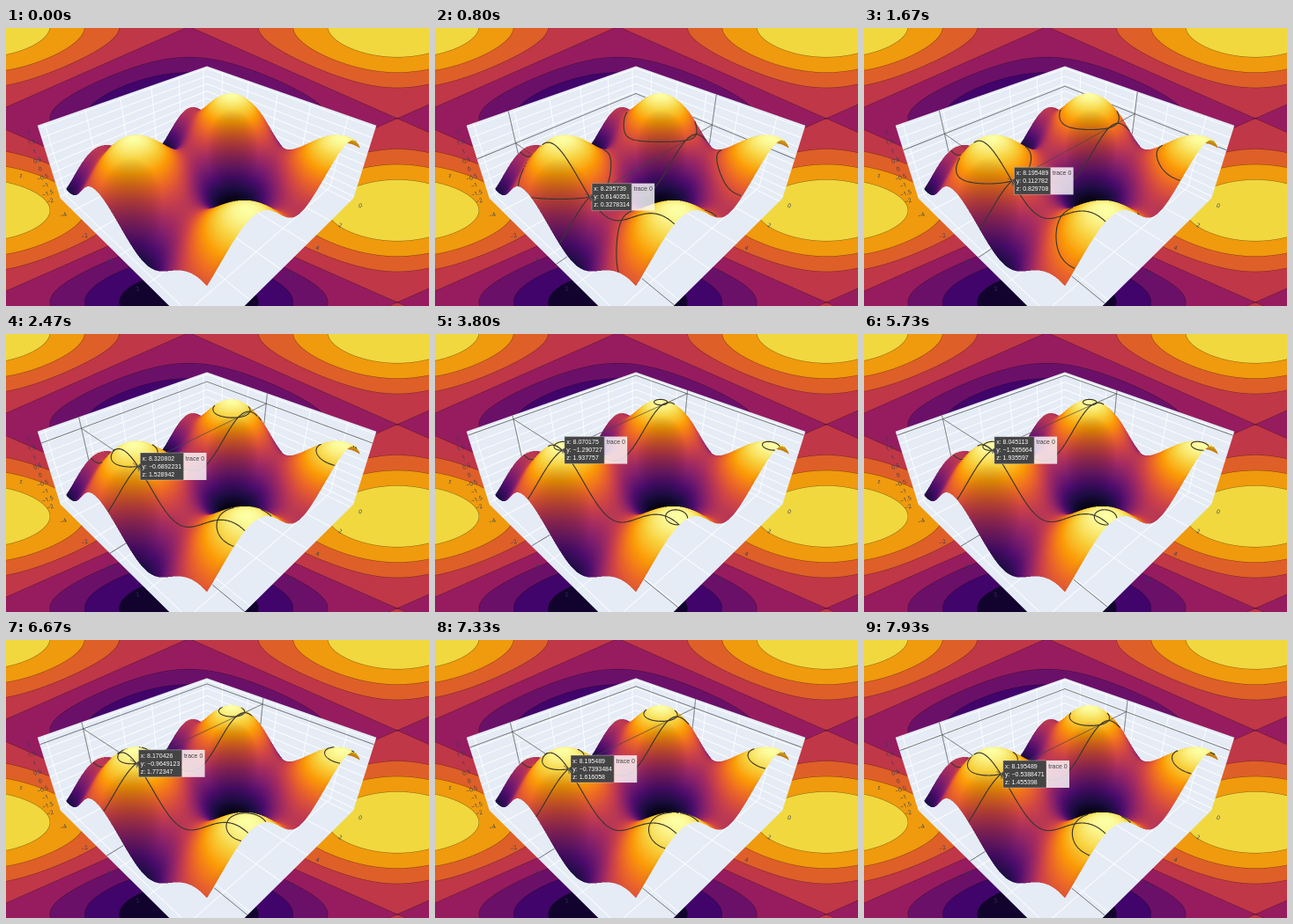
An HTML page with a canvas that plays this animation: 480 by 316 pixels, repeating every 8000 ms.

```html
<!DOCTYPE html>
<html lang="en">
<head>
<meta charset="utf-8">
<title>Surface hover</title>
<style>
html, body { margin: 0; width: 100%; height: 100%; overflow: hidden; }
canvas { display: block; width: 480px; height: 316px; }
</style>
</head>
<body>
<canvas id="stage" width="480" height="316"></canvas>
<script>
const W = 480, H = 316, SS = 2, BW = W * SS, BH = H * SS;
const LOOP = 8000, STEP = 1000 / 15, CELL = 10 / 399;
const { sin, cos, abs, min, max, hypot, floor, sqrt, PI } = Math;
const height = (x, y) => sin(x) - sin(y);
const rgb = hex => [1, 3, 5].map(i => parseInt(hex.slice(i, i + 2), 16));

// Axis box, padded by 1/32 of the data range on every side.
const X0 = -0.3125, X1 = 10.3125, Y0 = -5.3125, Y1 = 5.3125, Z0 = -2.125, Z1 = 2.125;

// Perspective camera on the (1,1,1) diagonal.
const UNIT = 0.12772, DIST = 2.165, FOCAL = 401.8, CX = 228, CY = 155.3;
const ELEV_SIN = sqrt(1 / 3), ELEV_COS = sqrt(2 / 3);
function project(x, y, z) {
  const side = (y - x + 5) * UNIT / Math.SQRT2;
  const near = (x - 5 + y) * UNIT / Math.SQRT2;
  const up = z * UNIT;
  const w = DIST - near * ELEV_COS - up * ELEV_SIN;
  const k = FOCAL / w;
  return [CX + side * k, CY - (up * ELEV_COS - near * ELEV_SIN) * k, w];
}

const INFERNO = ['#000004', '#1b0c41', '#4a0c6b', '#781c6d', '#a52c60',
  '#cf4446', '#ed6925', '#fb9b06', '#f7d13d', '#fcffa4'].map(rgb);
function inferno(t) {
  const p = min(max(t, 0), 1) * 9, i = min(floor(p), 8), f = p - i;
  return INFERNO[i].map((c, n) => c + (INFERNO[i + 1][n] - c) * f);
}
const RAMP = Array.from({ length: 512 }, (_, i) => inferno(i / 511));

function layer() {
  const canvas = document.createElement('canvas');
  canvas.width = BW;
  canvas.height = BH;
  return canvas;
}
function setPixel(data, index, color, shade) {
  const o = index * 4;
  for (let n = 0; n < 3; n++) data[o + n] = color[n] * shade;
  data[o + 3] = 255;
}

// Filled contour plot behind the scene.
const BANDS = ['#12032e', '#41046a', '#6b1068', '#961c5f',
  '#c03747', '#df5f28', '#f09a0d', '#f1d83f'].map(rgb);
function paintBackdrop(ctx) {
  const image = ctx.createImageData(BW, BH);
  const kx = 2 * PI / 473, ky = 2 * PI / 209;
  for (let j = 0; j < BH; j++) for (let i = 0; i < BW; i++) {
    const u = ((i + 0.5) / SS - 444) * kx, v = ((j + 0.5) / SS - 207.3) * ky;
    const g = cos(u) + cos(v);
    const band = min(max(floor((g + 2) * 2), 0), 7);
    const level = min(max(Math.round(g * 2) / 2, -1.5), 1.5);
    const slope = max(hypot(sin(u) * kx, sin(v) * ky), 0.001);
    const cover = min(max((0.45 - abs(g - level) / slope) * 2.5, 0), 1);
    setPixel(image.data, j * BW + i, BANDS[band], 1 - 0.45 * cover);
  }
  ctx.putImageData(image, 0, 0);
}

function poly(ctx, points, close) {
  ctx.beginPath();
  for (const p of points) {
    const [sx, sy] = project(...p);
    ctx.lineTo(sx, sy);
  }
  if (close) ctx.closePath();
}

function paintBox(ctx) {
  const panes = [
    [[X0, Y0, Z0], [X1, Y0, Z0], [X1, Y1, Z0], [X0, Y1, Z0]],
    [[X0, Y0, Z0], [X1, Y0, Z0], [X1, Y0, Z1], [X0, Y0, Z1]],
    [[X0, Y0, Z0], [X0, Y1, Z0], [X0, Y1, Z1], [X0, Y0, Z1]]
  ];
  ctx.fillStyle = ctx.strokeStyle = '#e5ecf6';
  ctx.lineWidth = 0.5;
  for (const pane of panes) {
    poly(ctx, pane, true);
    ctx.fill();
    ctx.stroke();
  }
  ctx.strokeStyle = '#fff';
  ctx.lineWidth = 0.9;
  const grid = (...points) => { poly(ctx, points); ctx.stroke(); };
  for (let x = 0; x <= 10; x += 2) grid([x, Y1, Z0], [x, Y0, Z0], [x, Y0, Z1]);
  for (let y = -4; y <= 4; y += 2) grid([X1, y, Z0], [X0, y, Z0], [X0, y, Z1]);
  for (let z = -2; z <= 2; z += 0.5) grid([X1, Y0, z], [X0, Y0, z], [X0, Y1, z]);
}

function paintTicks(ctx) {
  ctx.fillStyle = '#2a3f5f';
  ctx.textAlign = 'center';
  ctx.textBaseline = 'middle';
  ctx.font = '6.5px "Open Sans", sans-serif';
  function tick(value, point, side) {
    const [sx, sy] = project(...point);
    ctx.save();
    ctx.translate(sx + 11 * side, sy + 5.5);
    ctx.rotate(0.35 * side);
    ctx.fillText(String(value).replace('-', '−'), 0, 0);
    ctx.restore();
  }
  for (let z = -2; z <= 2; z += 0.5) tick(z, [X1, Y0, z], -1);
  for (let y = -4; y <= 2; y += 2) tick(y, [X1, y, Z0], -1);
  for (let x = 0; x <= 6; x += 2) tick(x, [x, Y1, Z0], 1);
  ctx.fillText('z', 17, 168);
}

// Dense sampling into a depth buffer that also hides the hover lines.
const depth = new Float32Array(BW * BH).fill(Infinity);
function paintSurface(ctx) {
  const canvas = layer(), local = canvas.getContext('2d');
  const image = local.createImageData(BW, BH);
  const N = 1700;
  for (let i = 0; i <= N; i++) {
    const x = 10 * i / N, nx = -cos(x), sx = sin(x);
    for (let j = 0; j <= N; j++) {
      const y = -5 + 10 * j / N, z = sx - sin(y);
      const [px, py, w] = project(x, y, z);
      const c = floor(px * SS), r = floor(py * SS);
      if (c < 0 || r < 0 || c >= BW || r >= BH) continue;
      const index = r * BW + c;
      if (w >= depth[index]) continue;
      depth[index] = w;
      const ny = cos(y), eye = 1.25 / UNIT;
      const facing = nx * (eye - x + 5) + ny * (eye - y) + eye - z;
      const light = (ELEV_COS - (nx + ny) * ELEV_SIN / Math.SQRT2) / sqrt(nx * nx + ny * ny + 1);
      const shade = min(0.8 + 0.8 * max(facing < 0 ? -light : light, 0), 1);
      setPixel(image.data, index, RAMP[Math.round((z + 2) / 4 * 511)], shade);
    }
  }
  local.putImageData(image, 0, 0);
  ctx.drawImage(canvas, 0, 0, W, H);
}

const base = layer();
{
  const ctx = base.getContext('2d');
  paintBackdrop(ctx);
  ctx.scale(SS, SS);
  paintBox(ctx);
  paintTicks(ctx);
  paintSurface(ctx);
}

const ctx = document.getElementById('stage').getContext('2d');

function visible(sx, sy, w) {
  const c = floor(sx * SS), r = floor(sy * SS);
  return c < 0 || r < 0 || c >= BW || r >= BH || w < depth[r * BW + c] + 0.025;
}
function trace(pointAt, width, count = 240) {
  ctx.beginPath();
  let pen = false;
  for (let i = 0; i <= count; i++) {
    const point = pointAt(i / count);
    const p = point && project(...point);
    const show = p && visible(...p);
    if (show) pen ? ctx.lineTo(p[0], p[1]) : ctx.moveTo(p[0], p[1]);
    pen = show;
  }
  ctx.lineWidth = width;
  ctx.stroke();
}
const spike = (a, b) => trace(t => a.map((v, n) => v + (b[n] - v) * t), 0.8);

function drawSpikes(x, y, z) {
  spike([X1, Y0, z], [X0, Y0, z]);
  spike([X0, Y0, z], [X0, Y1, z]);
  spike([x, Y0, Z0], [x, Y0, Z1]);
  spike([X0, y, Z0], [X0, y, Z1]);
  spike([x, Y0, Z0], [x, Y1, Z0]);
  spike([X0, y, Z0], [X1, y, Z0]);
  for (const foot of [[x, Y0, z], [X0, y, z], [x, y, Z0]]) spike([x, y, z], foot);
}

// Level curve around one peak: along each ray the height falls steadily.
function levelPoint(peakX, peakY, z, angle) {
  const c = cos(angle), s = sin(angle);
  let lo = 0, hi = PI / (abs(c) + abs(s));
  for (let n = 0; n < 18; n++) {
    const mid = (lo + hi) / 2;
    if (cos(mid * c) + cos(mid * s) > z) lo = mid; else hi = mid;
  }
  const x = peakX + lo * c, y = peakY + lo * s;
  return x >= 0 && x <= 10 && abs(y) <= 5 ? [x, y, z] : null;
}
function drawContours(x, y, z) {
  trace(t => [x, t * 10 - 5, height(x, t * 10 - 5)], 1.15);
  trace(t => [t * 10, y, height(t * 10, y)], 1.15);
  for (const px of [PI / 2, 5 * PI / 2]) for (const py of [-PI / 2, 3 * PI / 2])
    trace(t => levelPoint(px, py, z, t * 2 * PI), 1.15);
}

const format = v => String(+v.toPrecision(7)).replace('-', '−');
function drawLabel(x, y, z) {
  const [px, py] = project(x, y, z);
  const lines = [`x: ${format(x)}`, `y: ${format(y)}`, `z: ${format(z)}`];
  ctx.font = '7px "Liberation Sans", Arial, sans-serif';
  ctx.textBaseline = 'middle';
  const textWidth = max(...lines.map(s => ctx.measureText(s).width));
  const left = px + 2.6, right = left + textWidth + 4.6, top = py - 15.5;
  ctx.fillStyle = 'rgba(255,255,255,.8)';
  ctx.fillRect(right, top, ctx.measureText('trace 0').width + 4.6, 31);
  ctx.fillStyle = '#444';
  ctx.beginPath();
  ctx.moveTo(px, py);
  ctx.lineTo(left, py - 2.6);
  ctx.lineTo(left, top);
  ctx.lineTo(right, top);
  ctx.lineTo(right, top + 31);
  ctx.lineTo(left, top + 31);
  ctx.lineTo(left, py + 2.6);
  ctx.closePath();
  ctx.fill();
  ctx.strokeStyle = 'rgba(255,255,255,.6)';
  ctx.lineWidth = 0.5;
  ctx.stroke();
  ctx.fillText('trace 0', right + 2.3, py - 8.7);
  ctx.fillStyle = '#fff';
  lines.forEach((s, i) => ctx.fillText(s, left + 2.3, py + (i - 1) * 9 + 0.3));
}

// Pointer path: step, x cell, y cell.
const PATH = [[6, 333, 232], [25, 327, 204], [37, 332, 172], [57, 322, 148],
  [72, 317, 140], [100, 326, 161], [119, 327, 178]];
function tangent(i, n) {
  const a = PATH[max(i - 1, 0)], b = PATH[min(i + 1, PATH.length - 1)];
  return (b[n] - a[n]) / (b[0] - a[0]);
}
function cellAt(step, n) {
  let i = 0;
  while (i < PATH.length - 2 && step > PATH[i + 1][0]) i++;
  const a = PATH[i], b = PATH[i + 1], span = b[0] - a[0];
  const t = (step - a[0]) / span, t2 = t * t, t3 = t2 * t;
  return Math.round(a[n] * (2 * t3 - 3 * t2 + 1) + b[n] * (3 * t2 - 2 * t3) +
    span * (tangent(i, n) * (t3 - 2 * t2 + t) + tangent(i + 1, n) * (t3 - t2)));
}

function draw(step) {
  ctx.drawImage(base, 0, 0, W, H);
  if (step < PATH[0][0]) return;
  const x = cellAt(step, 1) * CELL, y = cellAt(step, 2) * CELL - 5, z = height(x, y);
  ctx.strokeStyle = '#444';
  drawSpikes(x, y, z);
  ctx.strokeStyle = '#3a3530';
  drawContours(x, y, z);
  drawLabel(x, y, z);
}

let shown = -1;
const start = performance.now();
function tick() {
  const time = (performance.now() - start) % LOOP;
  const step = min(floor((time + 4) / STEP), 119);
  if (step !== shown) draw(shown = step);
  requestAnimationFrame(tick);
}
tick();
</script>
</body>
</html>
```
